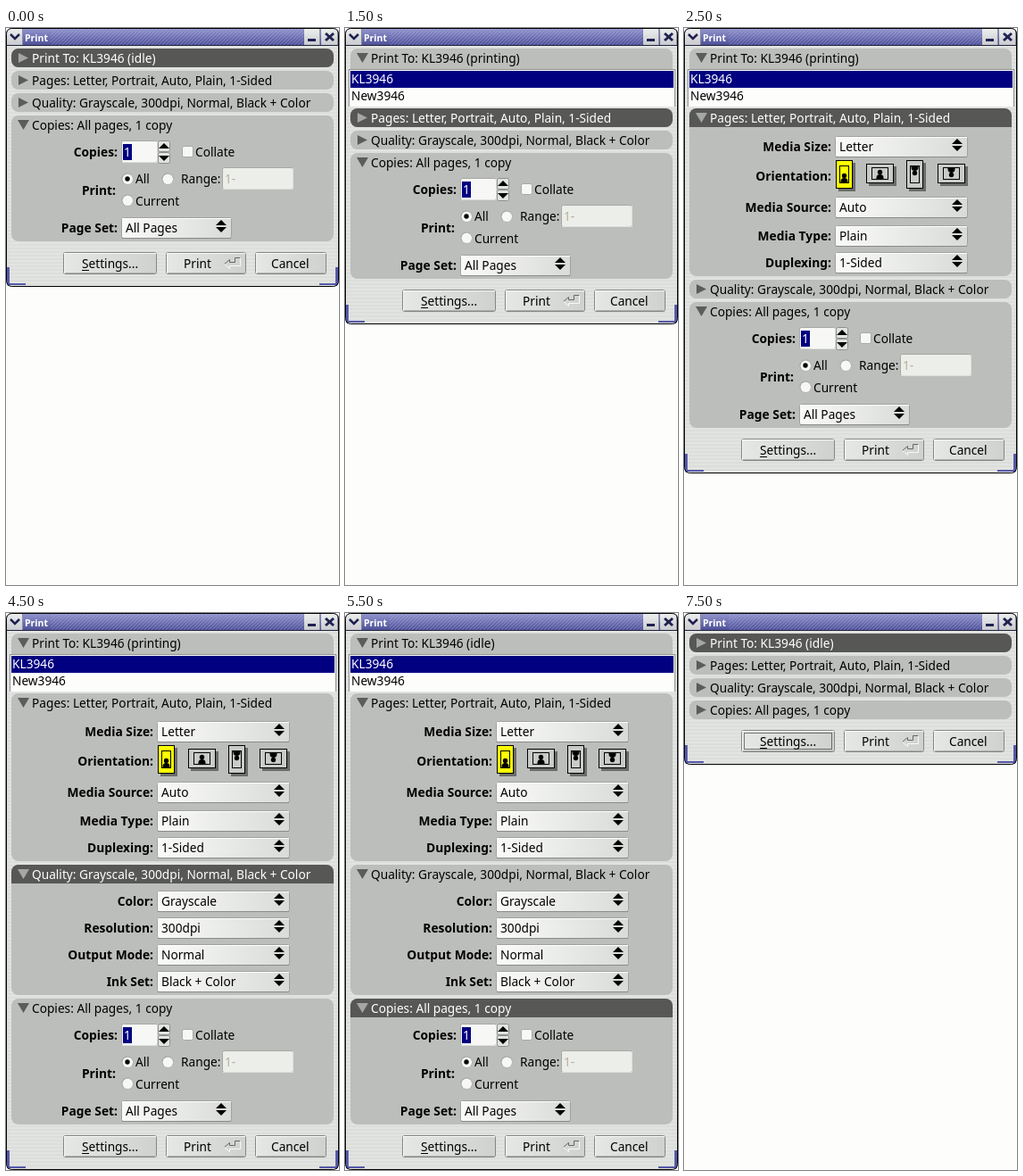
An HTML page with a canvas for the animation above (8000 ms loop, 373 by 624 pixels).

```html
<!DOCTYPE html>
<html lang="en">
<head>
<meta charset="utf-8">
<title>Print dialog</title>
<style>
html, body { margin: 0; width: 100%; height: 100%; overflow: hidden; background: #fdfefc; }
canvas { display: block; }
</style>
</head>
<body>
<canvas id="stage" width="373" height="624"></canvas>
<script>
const ctx = document.getElementById('stage').getContext('2d');
const LOOP = 8000, WIDTH = 373, RADIUS = 8;
const FAMILY = '"Noto Sans", "Open Sans", sans-serif';
const PLAIN = `13.7px ${FAMILY}`, BOLD = `bold 13.8px ${FAMILY}`;
const INK = '#000', PANEL = '#bcbebb', DARK = '#575855', NAVY = '#000080', BLUE = '#5558a8';

// open: sections unfolded; hot: section under the pointer
const states = [
  { open: [3], hot: 0 },
  { open: [0, 3], hot: 0, busy: true },
  { open: [0, 3], hot: 1, busy: true },
  { open: [0, 1, 3], hot: 1, busy: true },
  { open: [0, 1, 3], hot: 2, busy: true },
  { open: [0, 1, 2, 3], hot: 2, busy: true },
  { open: [0, 1, 2, 3], hot: 3 },
  { open: [0, 1, 2], hot: 3, busy: true, rowFocus: true },
  { open: [], hot: 0, buttonFocus: true }
];

const sections = [
  { title: s => `Print To: KL3946 (${s.busy ? 'printing' : 'idle'})`, height: 63, draw: drawPrinters },
  { title: () => 'Pages: Letter, Portrait, Auto, Plain, 1-Sided', height: 188, draw: drawPages },
  { title: () => 'Quality: Grayscale, 300dpi, Normal, Black + Color', height: 146, draw: drawQuality },
  { title: () => 'Copies: All pages, 1 copy', height: 141, draw: drawCopies }
];

function rect(x, y, w, h, color) {
  ctx.fillStyle = color;
  ctx.fillRect(x, y, w, h);
}

function round(x, y, w, h, radii, fill, stroke) {
  ctx.beginPath();
  ctx.roundRect(x, y, w, h, radii);
  if (fill) { ctx.fillStyle = fill; ctx.fill(); }
  if (stroke) { ctx.strokeStyle = stroke; ctx.lineWidth = 1; ctx.stroke(); }
}

function shape(points, color) {
  ctx.beginPath();
  points.forEach(([x, y]) => ctx.lineTo(x, y));
  ctx.fillStyle = color;
  ctx.fill();
}

function line(points, color, width) {
  ctx.beginPath();
  points.forEach(([x, y]) => ctx.lineTo(x, y));
  ctx.strokeStyle = color;
  ctx.lineWidth = width;
  ctx.stroke();
}

function disc(x, y, r, color) {
  ctx.beginPath();
  ctx.arc(x, y, r, 0, 7);
  ctx.fillStyle = color;
  ctx.fill();
}

function text(str, x, y, color = INK, font = PLAIN, align = 'left') {
  ctx.font = font;
  ctx.textAlign = align;
  ctx.fillStyle = color;
  ctx.fillText(str, x, y);
}

const label = (str, right, y) => text(str, right, y, INK, BOLD, 'right');

function shade(x0, y0, x1, y1, from, to) {
  const g = ctx.createLinearGradient(x0, y0, x1, y1);
  g.addColorStop(0, from);
  g.addColorStop(1, to);
  return g;
}

const across = (x, w, from, to) => shade(x, 0, x + w, 0, from, to);
const down = (y, h, from, to) => shade(0, y, 0, y + h, from, to);

function dotted(x, y, w, h, color) {
  ctx.setLineDash([1, 1]);
  ctx.strokeStyle = color;
  ctx.lineWidth = 1;
  ctx.strokeRect(x + .5, y + .5, w - 1, h - 1);
  ctx.setLineDash([]);
}

function upDown(x, y, gap) {
  shape([[x - 6, y - gap], [x, y - gap - 6], [x + 6, y - gap]], INK);
  shape([[x - 6, y + gap], [x, y + gap + 6], [x + 6, y + gap]], INK);
}

function field(x, y, w, h, fill = '#f7f8f5') {
  round(x + .5, y + .5, w - 1, h - 1, 2, fill, '#a6a8a5');
  line([[x + 1, y + h - .5], [x + w - .5, y + h - .5], [x + w - .5, y + 1]], '#dddfdc', 1);
}

function dropdown(value, x, w, baseline) {
  const y = baseline - 17;
  round(x + .5, y + .5, w - 1, 23, 2, across(x, w, '#fafbf8', '#d9dbd8'), '#a0a29f');
  rect(x + 1, y + 1, w - 2, 1, '#fff');
  rect(x + 1, y + 23, w - 2, 1, '#8a8c89');
  text(value, x + 5, baseline);
  upDown(x + w - 12, baseline - 7, 1);
}

function option(name, value, baseline) {
  label(name, 165, baseline);
  dropdown(value, 169, 149, baseline);
}

function radio(x, y, on) {
  disc(x, y, 6.5, '#a0a29f');
  disc(x + .3, y + .3, 5.8, '#f7f8f5');
  if (on) disc(x, y, 2.7, INK);
}

function orientation(x, y, w, h, color, flipped) {
  rect(x + 3, y + 3, w, h, '#6a6c69');
  rect(x, y, w, h, color);
  ctx.strokeStyle = INK;
  ctx.lineWidth = 1;
  ctx.strokeRect(x + .5, y + .5, w - 1, h - 1);
  const [dx, dy] = w < h ? [4, 6] : [6, 4];
  ctx.strokeRect(x + dx + .5, y + dy + .5, w - 2 * dx - 1, h - 2 * dy - 1);
  ctx.save();
  ctx.translate(x + w / 2, y + h / 2);
  if (flipped) ctx.scale(1, -1);
  const foot = h / 2 - dy - 1;
  disc(0, foot - 7.5, 2.7, INK);
  round(-4, foot - 5, 8, 5, [4, 4, 0, 0], INK);
  ctx.restore();
}

function drawPrinters(y, state) {
  rect(4, y + 23, 366, 42, '#8d8f8c');
  rect(5, y + 24, 364, 41, '#fdfefc');
  rect(6, y + 25, 362, 19, NAVY);
  if (state.rowFocus) dotted(6, y + 25, 362, 19, '#e8e88a');
  text('KL3946', 7, y + 39, '#fff');
  text('New3946', 7, y + 58);
}

function drawPages(y) {
  option('Media Size:', 'Letter', y + 48);
  label('Orientation:', 165, y + 81);
  orientation(170, y + 58, 19, 32, '#ffff00');
  orientation(204, y + 62, 31, 22, '#c9cbc8');
  orientation(249, y + 58, 19, 32, '#c9cbc8', true);
  orientation(284, y + 62, 31, 22, '#c9cbc8', true);
  option('Media Source:', 'Auto', y + 116);
  option('Media Type:', 'Plain', y + 148);
  option('Duplexing:', '1-Sided', y + 178);
}

function drawQuality(y) {
  option('Color:', 'Grayscale', y + 46);
  option('Resolution:', '300dpi', y + 76);
  option('Output Mode:', 'Normal', y + 106);
  option('Ink Set:', 'Black + Color', y + 136);
}

function drawCopies(y) {
  label('Copies:', 125, y + 46);
  field(129, y + 28, 41, 25);
  rect(131, y + 32, 10, 18, NAVY);
  text('1', 132, y + 46, '#fff');
  round(170.5, y + 28.5, 13, 12, 2, '#e2e4e1', '#8d8f8c');
  round(170.5, y + 41.5, 13, 12, 2, '#e2e4e1', '#8d8f8c');
  upDown(177, y + 41, 4);
  round(197.5, y + 34.5, 12, 12, 2, '#f7f8f5', '#a6a8a5');
  text('Collate', 212, y + 46);

  label('Print:', 123, y + 89);
  radio(136, y + 71, true);
  text('All', 145, y + 76);
  radio(181, y + 71);
  text('Range:', 196, y + 76);
  field(242, y + 58, 80, 25, '#eceeea');
  text('1-', 245, y + 76, '#b9ad97');
  radio(136, y + 95);
  text('Current', 145, y + 101);

  label('Page Set:', 125, y + 131);
  dropdown('All Pages', 129, 124, y + 131);
}

function drawSection(section, index, y, state) {
  const open = state.open.includes(index), hot = state.hot === index;
  const height = open ? section.height : 21;
  const topOnly = [RADIUS, RADIUS, 0, 0];
  round(6, y, 361, height, open && index === 0 ? topOnly : RADIUS, PANEL);
  if (hot) round(6, y, 361, 21, open ? topOnly : RADIUS, DARK);
  const arrow = open
    ? [[13, y + 5], [26, y + 5], [19.5, y + 16]]
    : [[14, y + 5], [25, y + 10.5], [14, y + 16]];
  shape(arrow, hot ? '#a5a7a4' : '#5b5d5a');
  text(section.title(state), 29, y + 16, hot ? '#fff' : INK);
  if (open) section.draw(y, state);
  return height;
}

function button(str, x, y, w, textX) {
  round(x + .5, y + .5, w - 1, 24, 2, across(x, w, '#e6e8e5', '#cfd1ce'), '#858784');
  rect(x + 1, y + 1, w - 2, 1, '#fafbf8');
  rect(x + 1, y + 1, 1, 23, '#f4f5f2');
  rect(x + 2, y + 23, w - 3, 1, '#adafac');
  text(str, textX, y + 18);
}

function drawButtons(y, state) {
  button('Settings...', 64, y, 105, 85);
  rect(85, y + 20, 8, 1, INK);
  if (state.buttonFocus) dotted(67, y + 3, 99, 19, INK);
  button('Print', 179, y, 90, 199);
  button('Cancel', 279, y, 80, 297);
  line([[244.5, y + 13.5], [250.5, y + 8.5], [250.5, y + 11.5], [256.5, y + 11.5],
    [256.5, y + 6.5], [262.5, y + 6.5]], '#666865', 1);
  line([[262.5, y + 6.5], [262.5, y + 15.5], [250.5, y + 15.5], [250.5, y + 18.5],
    [244.5, y + 13.5]], '#f8f9f6', 1);
}

function drawTitleBar() {
  rect(0, 0, WIDTH, 20, down(0, 20, '#9698d0', '#4b4e96'));
  ctx.save();
  ctx.beginPath();
  ctx.rect(50, 1, 283, 18);
  ctx.clip();
  for (let x = 50; x < 355; x += 4) line([[x, 0], [x - 20, 20]], 'rgba(190,192,235,.35)', 1);
  ctx.restore();
  text('Print', 21, 15, '#fff', `bold 10.5px ${FAMILY}`);
  for (const [x, w] of [[1, 18], [334, 18], [353, 19]]) {
    rect(x, 1, w, 18, down(1, 18, '#eceeee', '#c9cbcf'));
    rect(x + w - 1, 1, 1, 18, '#8a8ca0');
  }
  const navy = '#202250';
  line([[5, 7], [10, 12], [15, 7]], navy, 2.5);
  rect(338, 12, 9, 3, navy);
  line([[358, 6], [367, 14]], navy, 3);
  line([[367, 6], [358, 14]], navy, 3);
  rect(0, 19, WIDTH, 1, '#20203c');
}

function drawCorners(h) {
  for (const x of [1, 369]) rect(x, h - 22, 3, 21, BLUE);
  for (const x of [1, 351]) rect(x, h - 4, 21, 2, BLUE);
}

function draw(state) {
  rect(0, 0, WIDTH, 624, '#fdfefc');
  const total = sections.reduce((sum, s, i) => sum + (state.open.includes(i) ? s.height : 21) + 4, 19);
  const height = total + 51;

  ctx.save();
  ctx.beginPath();
  ctx.roundRect(0, 0, WIDTH, height, 6);
  ctx.clip();
  rect(0, 0, WIDTH, height, '#dcdedb');
  for (let y = 20; y < height; y += 4) rect(1, y, 371, 2, '#e2e4e1');
  drawTitleBar();
  drawCorners(height);
  ctx.restore();
  round(.5, .5, WIDTH - 1, height - 1, 6, null, INK);

  let y = 23;
  sections.forEach((section, i) => { y += drawSection(section, i, y, state) + 4; });
  drawButtons(total + 12, state);
}

function tick() {
  const time = performance.now() % LOOP;
  draw(states[Math.floor((time + 500) / 1000)]);
  requestAnimationFrame(tick);
}
tick();
</script>
</body>
</html>
```
